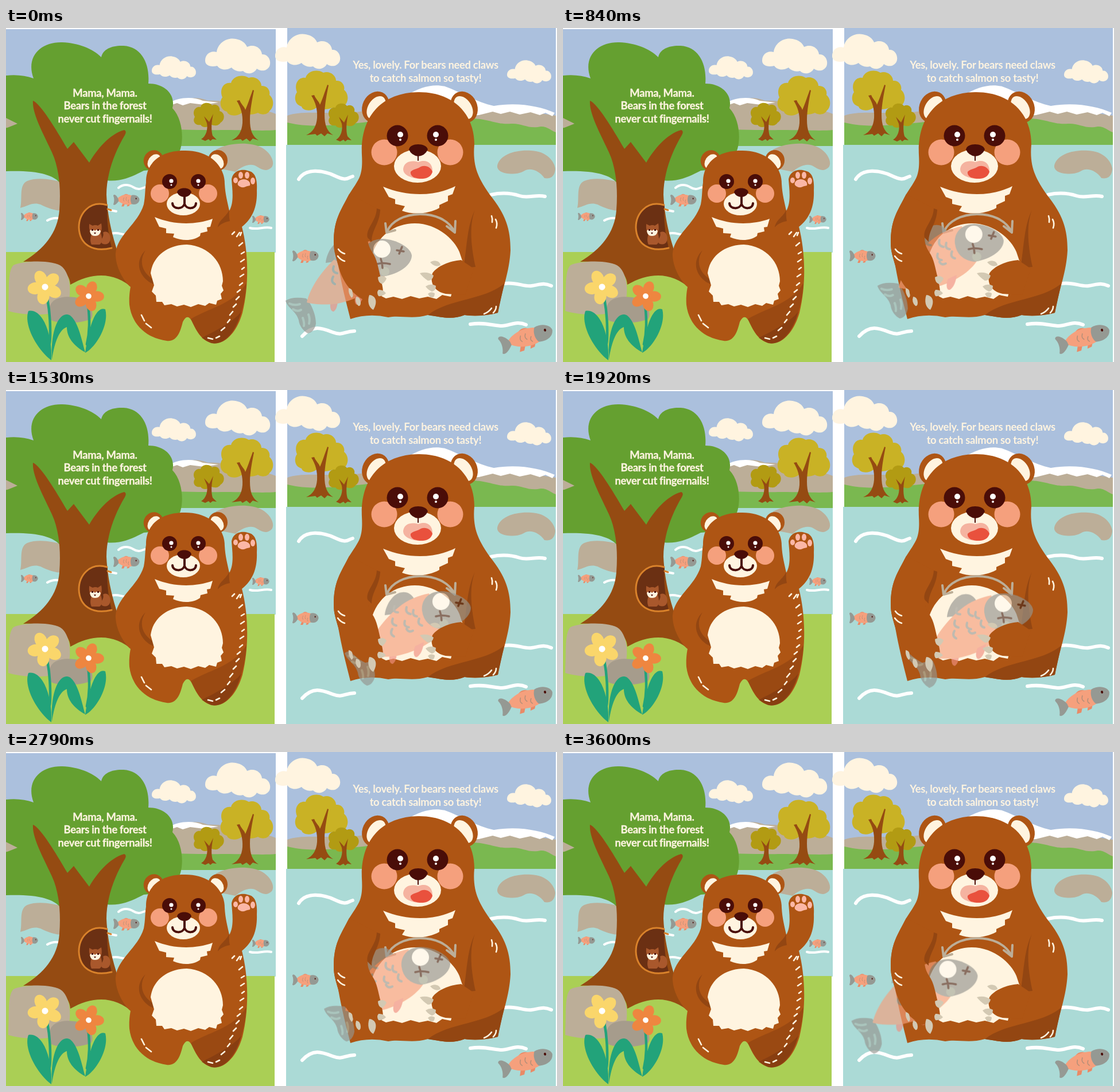
An HTML page that plays this animation: 960 px wide and 583 px high, repeating every 3800 ms.

```html
<!DOCTYPE html>
<html lang="en">
<head>
<meta charset="utf-8">
<title>Bears by the river</title>
<style>
html, body { margin: 0; width: 100%; height: 100%; overflow: hidden; background: #fff; }
svg { display: block; width: 960px; height: 583px; }
text { font: 700 18.4px Lato, "Open Sans", sans-serif; letter-spacing: -.3px; fill: #fff4e0; text-anchor: middle; }
.fur { fill: #ae5514; }
.shade { fill: #934612; }
.cream { fill: #fff4e0; }
.dark { fill: #4a0d08; }
.cheek { fill: #f5a07d; }
.rock { fill: #bcae98; }
.claw { fill: #d3c9b3; }
.line { fill: none; stroke-linecap: round; stroke-linejoin: round; }
.wave { stroke: #fff; }
.hair { stroke: #fff4e0; stroke-width: 2.6; }
.leaf { fill: #22a37a; }
</style>
</head>
<body>
<svg viewBox="0 0 960 583">
<defs>
  <path id="cloud" class="cream" d="M0 39C0 28 9 21 20 24C22 8 38-2 53 1C64 3 70 8 73 15C86 9 98 17 99 28C110 27 116 40 112 49C107 58 97 58 90 53C86 61 74 65 66 57C58 59 50 56 46 51C36 57 26 55 21 48C9 51 0 47 0 39Z"/>
  <g id="bigTree">
    <path fill="#c9b225" d="M-40 5C-46-10-37-22-25-20C-22-32-5-36 6-29C16-33 28-25 28-15C38-16 44-7 42 1C50 7 51 22 42 29C38 36 28 36 22 32C14 36 0 36-6 32C-14 39-30 38-32 30C-44 27-46 13-40 5Z"/>
    <path fill="#954b12" d="M-15 11L-10 10C-7 18-2 20 0 27C4 18 8 6 13-8L15-7C12 8 8 28 8 44C8 62 12 73 23 80L13 77L8 82L2 77L-5 81L-8 78L-24 80C-12 75-6 64-5 50C-4 35-8 22-15 11Z"/>
  </g>
  <g id="smallTree">
    <path fill="#b29b13" d="M-24 4C-30-7-21-15-14-13C-12-22 2-22 6-16C14-20 21-13 19-6C29-4 29 10 21 14C17 21 8 20 4 17C-2 24-11 23-14 18C-23 20-29 12-24 4Z"/>
    <path fill="#954b12" d="M-8 3L1 13L8-1C5 12 4 27 7 37L14 44L7 43L3 46L0 43L-6 46L-13 43C-4 38-1 25-3 15Z"/>
  </g>
  <g id="fish">
    <path fill="#e98a66" d="M-13-9C-8-15 2-16 8-11L8-8ZM-14 9L-18 16L-10 16L-6 10ZM4 10L1 16L9 15L13 9Z"/>
    <path fill="#f5a07d" d="M-35-1C-20-14 4-15 20-10V10C5 14-18 12-35-1Z"/>
    <path fill="#959993" d="M-29-2C-36-13-46-15-47-10C-43-4-43 4-47 11C-43 15-34 9-28 3Z"/>
    <path fill="#959993" d="M18-11C33-14 46-7 46 0C44 9 31 13 18 10C13 4 13-5 18-11Z"/>
    <circle class="dark" cx="34" cy="-3" r="2"/>
    <path class="line" stroke="#b58f78" stroke-width="1.5" d="M-9-5q-4 5 0 8M0-6q-4 5 0 8M8 0q-4 4 0 7"/>
  </g>
  <g id="flower">
    <g id="petal"><ellipse cx="0" cy="-17" rx="10.5" ry="13.5"/></g>
    <use href="#petal" transform="rotate(72)"/><use href="#petal" transform="rotate(144)"/>
    <use href="#petal" transform="rotate(216)"/><use href="#petal" transform="rotate(288)"/>
    <circle r="9"/><circle r="5.5" fill="#fff"/>
  </g>
</defs>

<!-- left page -->
<path fill="#abc0dd" d="M0 2H470V180H0Z"/>
<path class="rock" d="M0 157L60 140L280 135C310 121 334 119 352 127C380 125 440 138 470 150V182H0Z"/>
<path fill="#fff" d="M284 131C300 121 325 119 343 127L370 130L345 134L321 131L308 135L298 131L286 135Z"/>
<path fill="#7ab850" d="M0 174C140 169 300 180 380 178C420 178 450 180 470 178V208H0Z"/>
<path fill="#abdad6" d="M0 206H470V392H0Z"/>
<path fill="#aacf55" d="M0 391H468V583H0Z"/>
<path class="rock" d="M25 314C29 297 22 274 37 267C55 260 81 264 100 270V319C84 319 72 314 60 308C47 303 37 311 25 314ZM366 212C389 200 425 198 446 209C462 218 469 235 463 243C455 251 447 248 439 243C428 234 412 240 400 251L370 245Z"/>
<g class="line wave" stroke-width="4">
  <path d="M196 279C204 272 214 273 222 278S234 281 242 278M184 359C194 355 203 362 214 361M425 349C438 353 449 346 462 349M72 336C77 333 84 331 92 332M176 317L192 320"/>
</g>
<use href="#cloud" x="347" y="18"/>
<use href="#cloud" transform="translate(254 49) scale(.68 .66)"/>
<use href="#smallTree" x="353" y="151"/>
<use href="#bigTree" x="417" y="116"/>
<path fill="#65a030" d="M0 83C18 81 34 83 48 88C34 50 60 24 98 25C126 26 151 36 166 51C169 36 186 30 205 31C236 33 251 62 248 97C276 97 296 116 290 140C309 160 310 198 302 217C290 240 265 248 240 249C222 258 202 269 175 266L94 270C75 250 34 249 0 250V175L20 167L0 157Z"/>
<path fill="#954b12" d="M47 127C60 132 86 175 107 211L118 199L145 235C157 214 180 185 206 178Q211 180 207 187C189 217 175 255 175 291C177 340 193 400 222 455C190 426 152 425 112 448C111 421 80 405 30 408C66 386 90 358 93 318C96 278 92 243 80 217C68 190 45 150 47 127Z"/>
<path fill="#6b3013" d="M177 309C145 300 127 325 127 348C128 378 151 394 184 383C178 360 175 333 177 309Z"/>
<path class="line" stroke="#d9822b" stroke-width="3" d="M176 309C145 300 127 325 127 348C128 378 151 392 184 384M177 316L183 318"/>
<g fill="#a9582c">
  <path d="M167 376C163 368 172 366 169 357C179 351 185 366 180 374Q175 380 167 376Z"/>
  <path d="M145 342L151 345Q156 343 160 345L166 341Q168 350 165 358C168 365 168 376 163 378H149C146 372 147 365 149 360Q144 354 145 342Z"/>
  <path class="cream" d="M146 354Q150 349 155 354Q160 349 165 354Q164 363 155 363Q147 363 146 354Z"/>
  <path class="dark" d="M149 351h3v3h-3ZM159 351h3v3h-3ZM153 357h4l-2 3Z"/>
</g>
<use href="#fish" transform="translate(210 300) scale(.49 .72)"/>
<use href="#fish" transform="translate(41 329) scale(.32 .5)"/>
<use href="#fish" transform="translate(444 334) scale(.32 .5)"/>

<path class="rock" d="M4 485C6 460 2 425 13 414C30 406 83 404 98 417C112 430 115 462 107 486C90 505 30 502 4 494Z"/>
<path fill="#a69c8c" d="M75 492C77 474 93 467 120 470C144 474 156 496 148 508C132 515 96 518 79 510Z"/>
<path class="line" stroke="#22a37a" stroke-width="4.5" d="M72 472C79 510 77 545 76 550M143 482C146 510 146 530 141 552"/>
<path class="leaf" d="M39 494C62 489 81 530 79 580C55 562 30 519 39 494ZM80 579C77 520 96 492 112 502C126 513 132 545 138 566C118 555 106 540 106 522C94 526 85 545 80 579ZM138 567C145 515 158 485 173 491C180 518 157 557 138 567Z"/>
<use href="#flower" fill="#fad66b" transform="translate(68 452) rotate(-26)"/>
<use href="#flower" fill="#ee8640" transform="translate(144 468) rotate(20) scale(.88)"/>

<g>
  <ellipse class="fur" cx="257" cy="231" rx="17" ry="18" transform="rotate(30 257 231)"/>
  <ellipse class="fur" cx="369" cy="231" rx="17" ry="18"/>
  <ellipse class="cream" cx="258" cy="233" rx="10" ry="14" transform="rotate(35 258 233)"/>
  <ellipse class="cream" cx="368" cy="233" rx="10" ry="14" transform="rotate(-35 368 233)"/>
  <path class="fur" d="M310 214C352 213 381 238 381 272C382 291 386 304 389 319C398 304 394 280 393 264C396 247 413 246 421 249C435 251 438 265 437 283C438 310 431 331 411 347C421 386 425 442 412 497C403 529 382 554 359 550C340 546 331 527 324 512Q316 497 308 513C303 534 296 548 280 546C247 542 219 519 215 483C214 470 216 457 217 452C203 440 190 414 191 393C194 361 230 342 240 308C243 293 242 281 244 270C243 237 268 214 310 214Z"/>
  <path class="shade" d="M322 508C350 490 398 482 419 445C416 505 388 554 360 550C341 546 332 529 322 508Z" opacity=".75"/>
  <path fill="#7d3712" d="M341 541C368 527 397 512 410 495C400 535 378 555 357 550Z" opacity=".6"/>
  <path class="shade" d="M389 317C384 330 371 334 369 348C375 341 381 339 390 337Q388 328 389 317ZM243 388C230 408 238 430 261 441L258 447C238 441 219 412 243 388Z"/>
  <path class="cream" d="M252 428C256 396 285 378 315 378C355 381 378 410 378 442L376 450L379 458L374 464L376 473L368 476L366 483L354 480L347 485L335 482L322 487L310 483L298 486L288 482L276 484L272 478L262 478L261 467L254 460L258 449Z"/>
  <path class="cream" d="M259 330C290 343 327 345 360 333L356 347L350 348L351 355L339 358L338 363C327 371 309 373 291 365L293 359L279 358L279 350L267 347Z"/>
  <circle class="cheek" cx="268" cy="289" r="16"/><circle class="cheek" cx="352" cy="289" r="16"/>
  <ellipse class="cream" cx="309" cy="307" rx="29" ry="20"/>
  <circle class="dark" cx="285" cy="268" r="13"/><circle class="dark" cx="335" cy="268" r="13"/>
  <g fill="#fff"><circle cx="288" cy="267" r="3.6"/><circle cx="335" cy="267" r="3.6"/><circle cx="288" cy="274" r="1.5"/><circle cx="335" cy="274" r="1.5"/></g>
  <path class="dark" d="M298 287C299 277 322 277 323 287Q319 295 311 295Q302 295 298 287Z"/>
  <path class="line" stroke="#4a0d08" stroke-width="4" d="M311 293V307M290 306C291 317 308 317 311 307C314 317 330 317 331 306"/>
  <path fill="#fbb7a6" d="M404 274C402 268 409 264 414 264C420 264 427 268 425 275Q419 276 415 278Q408 279 404 274Z"/>
  <g fill="#fbb7a6"><ellipse cx="400" cy="266" rx="4" ry="5"/><ellipse cx="409" cy="257" rx="4" ry="6"/><ellipse cx="420" cy="257" rx="4" ry="6"/><ellipse cx="430" cy="267" rx="4" ry="6"/></g>
  <path class="line hair" d="M394 360l4-4M402 364l5-7M408 362l2-5M406 380l6-5M410 394l5-3M409 408l6-4M411 421l4-3M408 434l6-4M407 449l5-4M403 461l5-4M401 474l5-5M396 487l5-5M390 501l5-6M386 514l4-5M375 528l6-5M366 541l6-3M352 541l8 2M236 501l5 10M244 516l9 7"/>
</g>
<text stroke="#fff4e0" stroke-width=".3"><tspan x="172.500" y="119.500">Mama, Mama.</tspan><tspan x="172.500" y="142">Bears in the forest</tspan><tspan x="172.500" y="165">never cut fingernails!</tspan></text>

<!-- right page -->
<path fill="#abc0dd" d="M490 0H958V170H490Z"/>
<path class="rock" d="M490 153C518 142 575 153 625 145L690 120L820 138L850 146L905 145L958 153V184H490Z"/>
<path fill="#fff" d="M695 119C723 102 745 97 765 102C793 112 820 130 850 136C890 129 930 136 956 148L952 154L940 148L930 152L914 147L895 151L878 146L862 150L848 146L824 152L690 160Z"/>
<path fill="#7ab850" d="M490 165C530 175 582 169 630 164L810 158C842 158 852 169 880 167C900 166 910 177 932 172C945 172 950 180 958 182V207H490Z"/>
<path fill="#abdad6" d="M488 204H958V583H488Z"/>
<path class="rock" d="M856 240C860 221 888 212 915 214C942 215 956 233 957 246C956 260 948 264 938 262C930 250 914 242 902 250C888 258 854 256 856 240Z"/>
<g class="line wave" stroke-width="6">
  <path d="M510 264C522 244 552 248 573 258S594 262 604 259M845 291C864 287 880 288 895 293S923 290 939 294M868 446C889 443 902 452 916 450S936 444 950 450M809 517C834 513 850 520 864 520S889 510 906 518M516 538C535 517 551 524 569 531S590 529 607 529"/>
</g>
<use href="#cloud" x="469" y="10"/>
<use href="#cloud" transform="translate(873 56) scale(.68 .66)"/>
<use href="#bigTree" x="547" y="107"/>
<use href="#smallTree" x="588" y="152"/>
<use href="#fish" transform="translate(522 398) scale(.49 .75)"/>
<use href="#fish" transform="translate(907 541) rotate(-17) scale(1.020 1.250)"/>

<ellipse class="fur" cx="644" cy="138" rx="23" ry="28" transform="rotate(25 644 138)"/>
<ellipse class="fur" cx="798" cy="138" rx="23" ry="28" transform="rotate(-25 798 138)"/>
<ellipse class="cream" cx="645" cy="139" rx="14" ry="22" transform="rotate(32 645 139)"/>
<ellipse class="cream" cx="797" cy="139" rx="14" ry="22" transform="rotate(-32 797 139)"/>
<path class="fur" d="M718 112C776 111 816 147 816 203C812 245 826 266 843 291C871 326 879 351 879 388C877 427 865 453 857 497C839 502 817 504 799 501C774 511 755 503 735 501C708 509 687 501 666 505Q632 497 600 508C592 476 585 450 579 415C575 400 571 390 571 375C571 335 582 321 598 290C616 262 622 258 620 221C617 155 654 113 718 112Z"/>
<path class="shade" d="M735 501C772 472 832 476 868 446L857 497C840 502 818 503 799 501C777 510 755 504 735 501Z"/>
<path class="cream" d="M636 402C646 362 678 341 712 341C751 341 781 369 790 391L796 409L785 450L778 458L775 469L760 466L750 473L735 469L720 472L705 468L690 473L675 469L662 472L648 465Z"/>
<path class="cream" d="M657 277C700 295 748 294 783 276L778 290L770 293L770 302L755 309L755 314C738 324 710 327 690 319L695 311L678 307L678 299L667 295Z"/>
<circle class="cheek" cx="659" cy="217" r="22.500"/><circle class="cheek" cx="774" cy="217" r="22.500"/>
<ellipse class="cream" cx="717" cy="241" rx="41" ry="29"/>
<circle class="dark" cx="682" cy="188" r="18.500"/><circle class="dark" cx="752" cy="188" r="18.500"/>
<g fill="#fff"><circle cx="687" cy="186" r="5"/><circle cx="749" cy="186" r="5"/><circle cx="687" cy="195" r="2"/><circle cx="749" cy="195" r="2"/></g>
<path class="dark" d="M702 212C704 200 732 200 735 212Q730 223 718 224Q706 222 702 212Z"/>
<path class="line" stroke="#4a0d08" stroke-width="2" d="M718 220V231"/>
<path fill="#f5b3a0" d="M692 246C694 232 708 231 718 234C733 228 743 236 743 249C742 264 724 265 711 262C700 259 692 255 692 246Z"/>
<path fill="#e9513d" d="M705 251C710 246 717 246 721 243C729 238 740 242 743 251C739 264 724 265 711 261Q704 257 705 251Z"/>
<path class="shade" d="M817 318C806 345 811 385 818 417L797 419C803 385 803 345 817 318Z"/>
<path class="line" stroke="#bcae98" stroke-width="4" d="M664 355C680 317 760 313 781 355M661 341L663 357L678 353M768 346L782 357L783 337"/>

<g id="catch" opacity=".66">
  <path fill="#95958f" d="M487 476Q499 468 523 472C531 480 540 499 540 516Q537 531 526 533C518 529 511 520 510 510C505 493 492 491 487 476ZM557 410C559 389 574 370 588 370C597 369 604 374 608 381L596 405Z"/>
  <path fill="#f08f80" d="M565 480Q564 495 571 495Q577 491 578 477Z"/>
  <path fill="#f5a07d" d="M524 479C530 453 551 421 580 397C598 382 615 376 634 372L660 433C645 456 612 474 578 481C555 484 533 482 524 479Z"/>
  <path fill="#f08f80" d="M610 464C606 474 607 484 613 483C620 479 624 468 625 457Z"/>
  <path fill="#95958f" d="M622 402C620 382 635 368 656 368C681 369 705 383 707 397C707 412 688 429 656 434Q626 430 622 402Z"/>
  <circle cx="655" cy="386" r="15" fill="#fffaf0"/>
  <circle cx="660" cy="425" r="8" fill="#a5ab9b"/>
  <path class="line" stroke="#4d2a1d" stroke-width="3.500" d="M646 412Q657 409 669 412M653 403Q656 411 656 419M681 388L693 390M690 382L685 394"/>
  <path class="line" stroke="#9d9d96" stroke-width="4" d="M574 394q-4 11 6 11M595 396q-3 10 7 12M571 416q-4 10 6 12M592 420q-3 10 7 11M607 401q-3 10 6 11M595 434q4 7 11 3M617 416q-4 10 5 12M570 434q-5 9 3 13"/>
  <path class="line" stroke="#aabbb0" stroke-width="4" d="M494 481Q502 485 512 482M500 491Q508 496 514 492M517 506Q520 514 519 520M527 500Q530 508 528 516"/>
</g>

<path class="fur" d="M598 290C582 321 571 335 571 375C571 390 575 400 579 415C585 440 600 463 626 476L653 470C661 461 654 447 653 436C648 418 647 404 638 391C630 379 627 365 634 350L652 318Z"/>
<path class="shade" d="M652 317C651 342 637 352 637 373L630 366C626 350 645 338 646 315Z"/>
<path class="fur" d="M793 405C772 407 752 415 743 428C738 445 746 460 766 464L800 466L815 420Z"/>
<g class="claw">
  <path d="M648 435Q657 430 663 437Q661 443 655 447Q648 444 648 435ZM649 457Q657 456 662 463Q656 469 649 468Q645 462 649 457ZM597 454Q604 455 604 463Q606 469 602 471Q596 464 597 454ZM610 469Q617 469 618 479Q618 486 614 485Q607 479 610 469ZM633 466C645 467 648 479 640 492C632 488 629 477 633 466Z"/>
  <path d="M739 409C747 403 757 408 757 414Q748 419 739 409ZM721 428Q734 424 745 432Q743 441 735 441Q726 435 721 428ZM731 451Q740 445 749 450Q749 459 742 460Q735 457 731 451ZM735 464Q740 459 747 463Q747 472 739 470Z"/>
</g>
<path class="line hair" stroke-width="3" d="M579 386Q583 392 590 394M578 398Q583 405 590 407M846 328Q848 333 847 339M853 334Q857 341 854 349M833 499Q841 496 846 489M849 497Q854 492 854 486"/>
<text><tspan x="731" y="71">Yes, lovely. For bears need claws</tspan><tspan x="731" y="94">to catch salmon so tasty!</tspan></text>
</svg>
<script>
const LOOP = 3800, TICK = 30;
// time in ms, then the shift of the salmon along its arc
const path = [
  [0, 0, 0], [540, 40, -17.5], [930, 67, -28.5], [1080, 77, -26.5],
  [1620, 108, -15], [1800, 118, -12], [1920, 112, -13.5], [2160, 100, -19],
  [2400, 88, -24], [2760, 69, -28.5], [3240, 38, -15.5], [3600, 15.5, -6.5],
  [LOOP, 15.5, -6.5]
];
const frames = path.map(([t, x, y], i) => {
  const next = path[i + 1];
  return {
    offset: t / LOOP,
    transform: `translate(${x}px, ${y}px)`,
    easing: next ? `steps(${Math.max(1, Math.round((next[0] - t) / TICK))}, end)` : "linear"
  };
});
document.getElementById("catch").animate(frames, { duration: LOOP, iterations: Infinity });
</script>
</body>
</html>
```
